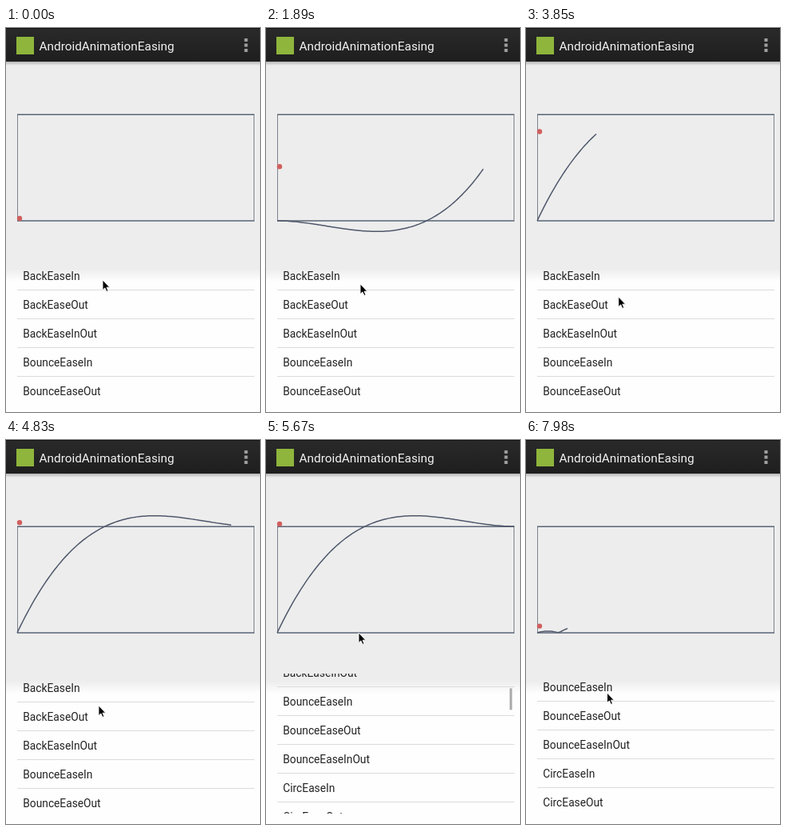
An HTML page that plays this animation: 318x480 px, repeating every 8 s.

```html
<!DOCTYPE html>
<html lang="en">
<head>
<meta charset="utf-8">
<title>AndroidAnimationEasing</title>
<style>
  html, body { margin: 0; width: 100%; height: 100%; overflow: hidden; background: #fff; }
  svg { display: block; width: 318px; height: 480px; font-family: Roboto, sans-serif; }
  #rows text { font-size: 13.75px; fill: #222; }
  #rows rect { fill: #dcdcdc; }
</style>
</head>
<body>
<svg viewBox="0 0 318 480">
  <defs>
    <linearGradient id="page" x1="0" y1="0" x2="0" y2="480" gradientUnits="userSpaceOnUse">
      <stop offset="0.628" stop-color="#ededed"/>
      <stop offset="0.66" stop-color="#fefefe"/>
    </linearGradient>
    <linearGradient id="bar" x1="0" y1="0" x2="0" y2="1">
      <stop offset="0" stop-color="#2a2a2a"/>
      <stop offset="1" stop-color="#1e1e1e"/>
    </linearGradient>
    <linearGradient id="shade" x1="0" y1="0" x2="0" y2="1">
      <stop offset="0" stop-color="#b4b4b4"/>
      <stop offset="1" stop-color="#ededed"/>
    </linearGradient>
    <clipPath id="view"><rect x="12" y="292" width="300" height="175"/></clipPath>
  </defs>

  <rect width="318" height="480" fill="url(#page)"/>
  <rect width="318" height="42" fill="url(#bar)"/>
  <rect width="318" height="1" fill="#111"/>
  <rect y="42" width="318" height="5" fill="url(#shade)"/>
  <rect x="13" y="11" width="22" height="22" fill="#8fb53c"/>
  <text x="41.5" y="27.5" font-size="15.35" fill="#f3f3f3">AndroidAnimationEasing</text>
  <path d="M298.500 13h4v4h-4zM298.500 19.500h4v4h-4zM298.500 26h4v4h-4z" fill="#a0a0a0"/>

  <path d="M14.500 108V241M310.500 108V241" stroke="#7c828c"/>
  <path d="M14 108.300H311M14 241H311" stroke="#5a6577" stroke-width="1.600"/>
  <path id="curve" fill="none" stroke="#4f586b" stroke-width="1.500" stroke-linejoin="round"/>
  <circle id="dot" cx="17" r="3.200" fill="#d15f5f"/>

  <g clip-path="url(#view)">
    <rect id="press" x="13" y="292" width="298" height="35" fill="#33b5e5" fill-opacity="0.4"/>
    <g id="rows"></g>
  </g>
  <rect id="thumb" x="305" width="3.200" height="27" fill="#b0b0b0"/>
  <path id="cursor" d="M0 0V12.500L2.900 9.900L4.900 14.400L6.900 13.500L5 9.200H8.800Z"
        fill="#000" stroke="#fff" stroke-width="0.900"/>
</svg>
<script>
const LOOP = 8000, STEP = 70;
const LEFT = 14, BASE = 241, WIDTH = 297, HEIGHT = 133, ROW = 36;
const $ = id => document.getElementById(id);

const names = ['Back', 'Bounce', 'Circ'].flatMap(
  n => ['In', 'Out', 'InOut'].map(kind => n + 'Ease' + kind));
$('rows').innerHTML = names.map((name, i) =>
  `<text x="21.300" y="${315 + ROW * i}">${name}</text>` +
  `<rect x="14" y="${327 + ROW * i}" width="297" height="1"/>`).join('');

const backIn = t => t * t * (2.70158 * t - 1.70158);
const backOut = t => 1 - backIn(1 - t);
function bounceOut(t) {
  const hops = [[1, 0, 0], [2, 1.5, 0.75], [2.5, 2.25, 0.9375], [2.75, 2.625, 0.984375]];
  const [, mid, rise] = hops.find(h => t * 2.75 <= h[0]) || hops[3];
  return 7.5625 * (t - mid / 2.75) ** 2 + rise;
}
const bounceIn = t => 1 - bounceOut(1 - t);

// press: row highlight start; phase: [ms, angle] of the cosine pacing
const runs = [
  { press: 70, row: 0, ease: backIn, phase: [[294, 0], [1050, 1.1365], [1890, 2.4], [2383, Math.PI]] },
  { press: 2870, row: 1, ease: backOut, phase: [[3153, 0], [3850, 1.0453], [4410, 1.7433], [5180, Math.PI]] },
  { press: 7280, row: 3, ease: bounceIn, phase: [[7492, 0], [7980, 0.7318]] }
];
const scroll = [[4900, 0], [5040, 17], [5250, 57], [5390, 75], [5530, 85], [5670, 91],
  [5810, 99], [5950, 106], [6090, 109]];
const thumbFade = [[4900, 0], [4970, 1], [6580, 1], [6790, 0.6], [7000, 0]];
const pointerX = [[1120, 121], [1820, 118], [1960, 118], [2660, 115.5], [5040, 116],
  [6160, 116], [6600, 101.5]];
const pointerY = [[1120, 315], [1820, 320], [1960, 320], [2660, 336], [3850, 336],
  [4410, 341], [4760, 335], [4900, 329], [5250, 265], [5460, 247], [5670, 241],
  [5950, 230], [6160, 229], [6600, 309], [7630, 309], [7910, 316]];

function at(keys, t) {
  if (t <= keys[0][0]) return keys[0][1];
  for (let i = 1; i < keys.length; i++) {
    const [t0, a] = keys[i - 1], [t1, b] = keys[i];
    if (t <= t1) return a + (b - a) * (t - t0) / (t1 - t0);
  }
  return keys[keys.length - 1][1];
}

function drawCurve(ease, end) {
  const count = Math.ceil(end * 120);
  let d = '';
  for (let i = 0; i <= count && count; i++) {
    const p = end * i / count;
    d += (i ? 'L' : 'M') + (LEFT + WIDTH * p).toFixed(2) + ' ' + (BASE - HEIGHT * ease(p)).toFixed(2);
  }
  $('curve').setAttribute('d', d);
  $('dot').setAttribute('cy', BASE - 3 - HEIGHT * ease(end));
}

function draw(t) {
  const run = runs.filter(r => t >= r.press + STEP).pop() || runs[0];
  drawCurve(run.ease, (1 - Math.cos(at(run.phase, t))) / 2);

  const offset = at(scroll, t);
  $('rows').setAttribute('transform', `translate(0 ${-Math.round(offset)})`);
  $('thumb').setAttribute('y', 296 + 0.158 * offset);
  $('thumb').setAttribute('opacity', at(thumbFade, t));

  const pressed = runs.find(r => t >= r.press && t < r.press + STEP);
  $('press').setAttribute('visibility', pressed ? 'visible' : 'hidden');
  if (pressed) $('press').setAttribute('y', 292 + ROW * pressed.row - Math.round(offset));

  $('cursor').setAttribute('transform', `translate(${at(pointerX, t)} ${at(pointerY, t)})`);
}

const start = performance.now();
function tick() {
  const t = (performance.now() - start) % LOOP;
  draw(Math.floor(t / STEP) * STEP);
  requestAnimationFrame(tick);
}
tick();
</script>
</body>
</html>
```
